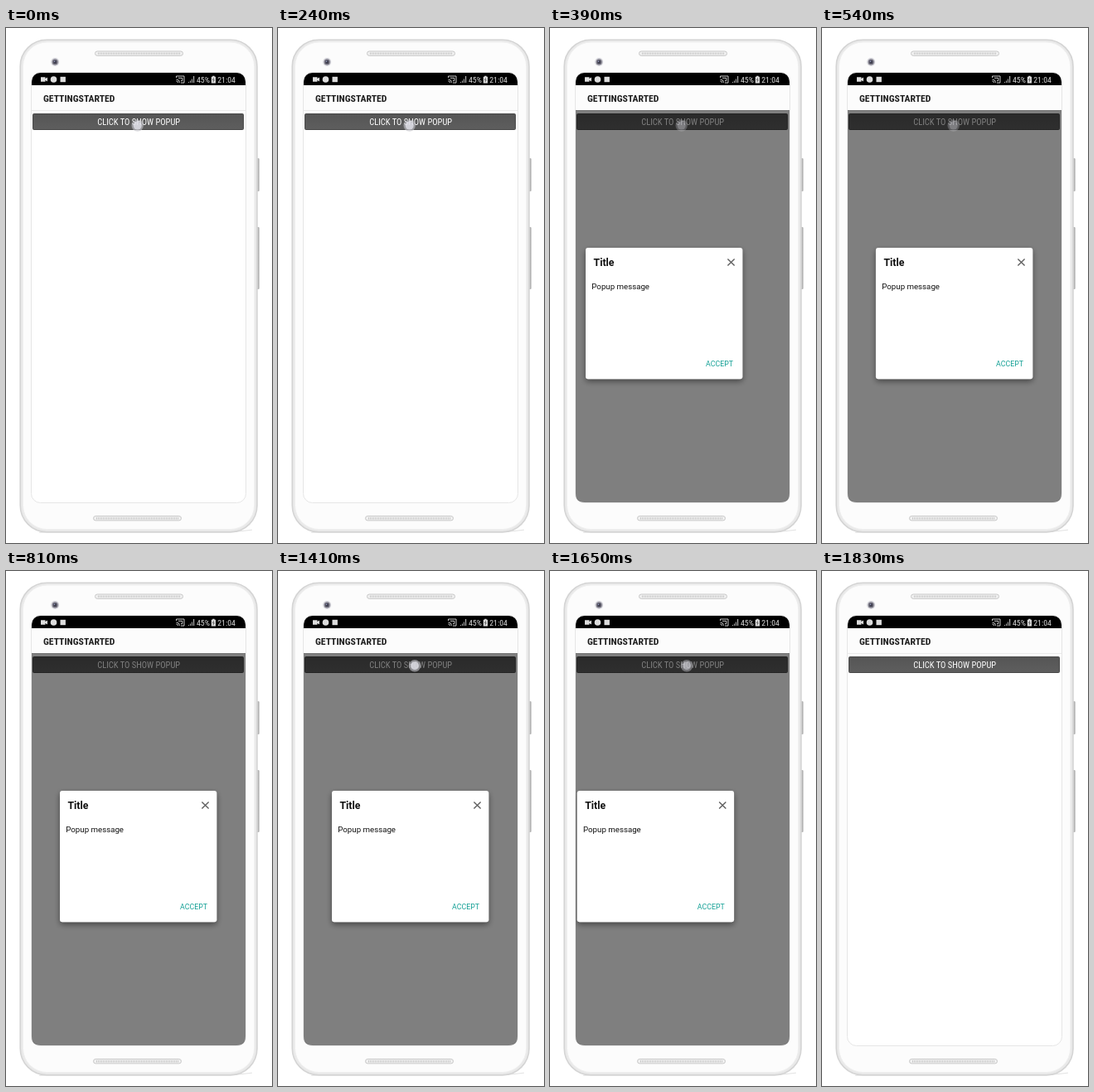
These frames come from a looping animation (321 by 621 pixels, 1860 ms). An HTML page:

```html
<!DOCTYPE html>
<html lang="en">
<head>
<meta charset="utf-8">
<title>Sliding popup</title>
<style>
  html, body { margin: 0; width: 100%; height: 100%; overflow: hidden; background: #fff; }
  svg { display: block; width: 321px; height: 621px; font-family: Roboto, sans-serif; }
  .narrow { font-family: "Roboto Condensed", Roboto, sans-serif; font-stretch: 75%; }
</style>
</head>
<body>
<svg viewBox="0 0 321 621">
  <defs>
    <clipPath id="screenClip"><rect x="31" y="54" width="258" height="518" rx="10.5"/></clipPath>
    <clipPath id="contentClip"><path d="M31 99H289V561.5Q289 572 278.5 572H41.5Q31 572 31 561.5Z"/></clipPath>
    <filter id="shadow" x="-15%" y="-15%" width="130%" height="135%">
      <feDropShadow dx="0" dy="3" stdDeviation="3.5" flood-color="#000" flood-opacity=".45"/>
    </filter>
    <linearGradient id="buttonFill" x2="0" y2="1">
      <stop stop-color="#555"/><stop offset="1" stop-color="#5e5e5e"/>
    </linearGradient>
    <linearGradient id="keyFill">
      <stop stop-color="#e6e6e6"/><stop offset=".5" stop-color="#cfcfcf"/><stop offset="1" stop-color="#949494"/>
    </linearGradient>
    <g id="grille">
      <rect x=".5" y=".5" width="106" height="5.4" rx="2.7" fill="#f0f0f0" stroke="#c9c9c9"/>
      <path d="M4 3.2H103" stroke="#c6c6c6" stroke-width="2.6" stroke-dasharray="1 1"/>
    </g>
  </defs>

  <!-- Phone body -->
  <path d="M40 608.2H270L297 605.2" fill="none" stroke="#e2e2e2"/>
  <g fill="url(#keyFill)">
    <rect x="302" y="157" width="3.5" height="40" rx="1"/>
    <rect x="302" y="240" width="3.5" height="75" rx="1"/>
  </g>
  <rect x="17.2" y="14.2" width="285.8" height="593.6" rx="32" fill="#e9e9e9" stroke="#d4d4d4" stroke-width="1.6"/>
  <rect x="20.5" y="17" width="279.2" height="587.5" rx="29" fill="#fcfcfc" stroke="#f0f0f0"/>
  <use href="#grille" x="107" y="27.5"/>
  <use href="#grille" x="105" y="588"/>
  <circle cx="59.2" cy="41" r="5" fill="#d2d2d8"/>
  <circle cx="59.2" cy="41" r="3.5" fill="#74727f"/>
  <circle cx="59.2" cy="41" r="2" fill="#3c3c4c"/>
  <circle cx="58.5" cy="40.2" r=".8" fill="#9aa0c4"/>

  <!-- Screen -->
  <rect x="30.5" y="53.5" width="259" height="519" rx="11" fill="#fff" stroke="#e6e6e6"/>
  <g clip-path="url(#screenClip)">
    <rect x="31" y="54" width="258" height="15" fill="#000"/>
    <rect x="31" y="69" width="258" height="30" fill="#fcfcfc"/>
    <path d="M31 99.5H289" stroke="#eaeaea"/>
  </g>
  <g fill="#dcdcdc">
    <path d="M42 59.3H47.5V61L50 59.6V64.4L47.5 63V64.7H42Z"/>
    <circle cx="57.5" cy="62" r="3.8"/>
    <rect x="65.5" y="58.8" width="6.4" height="6.4"/>
    <path d="M220 66h1v-1h-1zM222 66h1v-2.5h-1zM224 66h1v-4.5h-1zM226 66h1.2v-8h-1.2z" opacity=".8"/>
    <path d="M249.2 57.8h2.4v1h1.4v7.7h-5.2v-7.7h1.4z"/>
  </g>
  <path d="M251 60l-1.5 2.6h1.8l-1.4 2.4" fill="none" stroke="#333" stroke-width=".7"/>
  <path d="M205.5 60V58H215V66H211M205.5 62a4 4 0 0 1 4 4M205.5 64a2 2 0 0 1 2 2M208 60.3h4.8v3.4h-1.8"
        fill="none" stroke="#dcdcdc" stroke-width=".9"/>
  <g class="narrow">
    <text x="230" y="65.6" data-width="16" fill="#dcdcdc">45%</text>
    <text x="255.3" y="65.6" data-width="21.5" fill="#dcdcdc">21:04</text>
    <text x="45" y="88.9" data-width="86.5" font-weight="700" fill="#1c1c1c">GETTINGSTARTED</text>
    <rect x="32.5" y="103.5" width="254" height="19" rx="1" fill="url(#buttonFill)" stroke="#484848"/>
    <text x="160.2" y="117.4" data-width="100" text-anchor="middle" fill="#fff">CLICK TO SHOW POPUP</text>
  </g>

  <g id="modal" clip-path="url(#contentClip)">
    <rect x="31" y="99" width="258" height="473" fill="#000" opacity=".5"/>
    <g id="popup">
      <rect x="65" y="265" width="189.3" height="158.3" rx="3" fill="#fff" filter="url(#shadow)"/>
      <text x="74.5" y="287.2" font-size="12.3" font-weight="700" fill="#111">Title</text>
      <text x="72.3" y="314.6" font-size="9.7" fill="#111">Popup message</text>
      <text x="210" y="408" font-size="8.8" fill="#109f94">ACCEPT</text>
      <path d="M236.4 278.4l8.2 8.2m0-8.2l-8.2 8.2" stroke="#606060" stroke-width="1.4"/>
    </g>
  </g>

  <g id="touch">
    <circle r="7.2" fill="#c4c4cc" opacity=".6"/>
    <circle r="5" fill="#e4e4ec" opacity=".75"/>
  </g>
</svg>
<script>
const LOOP = 1860, SLIDE = 300, TRAVEL = 258;
const HOLDS = [0, 210, 240, 300, 360, 390, 450, 510, 570, 600, 780, 810,
               1410, 1470, 1530, 1590, 1650, 1710, 1770, 1800, 1830];
const ENTER = 222, LEAVE = 1500;
const modal = document.getElementById('modal');
const popup = document.getElementById('popup');
const touch = document.getElementById('touch');
const clamp = x => Math.min(1, Math.max(0, x));
const show = (node, on) => node.setAttribute('visibility', on ? 'visible' : 'hidden');

// Choose the type size that suits the installed face.
for (const label of document.querySelectorAll('[data-width]')) {
  label.style.fontSize = '10px';
  label.style.fontSize = 10 * label.dataset.width / label.getComputedTextLength() + 'px';
}

function draw(time) {
  const t = HOLDS.findLast(hold => hold <= time);
  const remaining = 1 - clamp((t - ENTER) / SLIDE);
  const leaving = clamp((t - LEAVE) / SLIDE);
  popup.setAttribute('transform', `translate(${-TRAVEL * (remaining ** 3 + leaving ** 3)} 0)`);
  show(modal, t >= 300 && t < 1800);

  const second = t >= 1410;
  const pressed = t < 300 || (second && t < 1530);
  touch.setAttribute('transform', second ? 'translate(165 114.3)' : 'translate(158.7 117.6)');
  touch.setAttribute('opacity', pressed ? 1 : second ? 0.75 : 0.5);
  show(touch, t < 780 || (second && t < 1800));
}

function tick() {
  draw(performance.now() % LOOP);
  requestAnimationFrame(tick);
}
tick();
</script>
</body>
</html>
```
